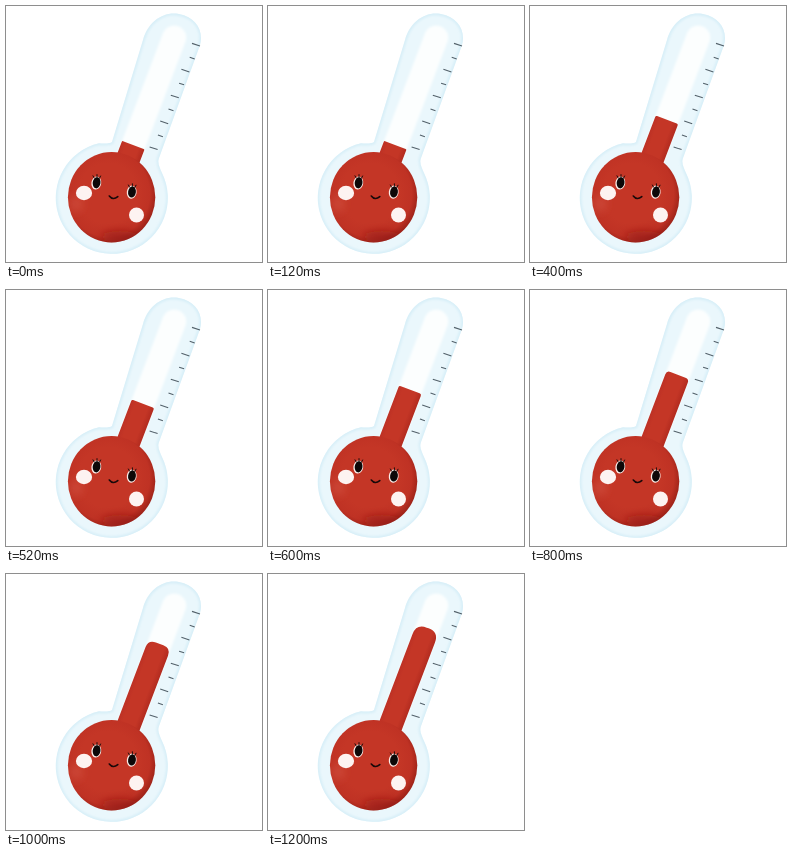
Animation, 256 px wide and 256 px high, one loop 1.4 s. Source, as an HTML page:

```html
<!DOCTYPE html>
<html lang="en">
<head>
<meta charset="utf-8">
<title>Thermometer</title>
<style>
  html, body { margin: 0; width: 100%; height: 100%; overflow: hidden; background: #fff; }
  svg { display: block; width: 100vw; height: 100vh; }
</style>
</head>
<body>
<svg viewBox="0 0 256 256">
  <defs>
    <radialGradient id="red" cx=".46" cy=".46" r=".56">
      <stop offset=".6" stop-color="#c43626"/>
      <stop offset=".85" stop-color="#bf3224"/>
      <stop offset="1" stop-color="#9c2218"/>
    </radialGradient>
    <linearGradient id="stem">
      <stop offset="0" stop-color="#bd3125"/>
      <stop offset=".2" stop-color="#c43626"/>
      <stop offset=".75" stop-color="#c43626"/>
      <stop offset="1" stop-color="#b22b1f"/>
    </linearGradient>
    <filter id="soft" x="-30%" y="-30%" width="160%" height="160%"><feGaussianBlur stdDeviation="1"/></filter>
    <filter id="shade" x="-60%" y="-60%" width="220%" height="220%"><feGaussianBlur stdDeviation="4"/></filter>
    <path id="shell" d="M106 136 L137 34 C142 16 157 5 173 8 C190 11 198 25 194 39 L153 152 C151 157 154 162 156 167 A56 56 0 1 1 93 137.3 Q104 138 106 136Z"/>
    <clipPath id="inside"><use href="#shell"/></clipPath>
    <clipPath id="ball"><ellipse cx="105.6" cy="191.2" rx="43.7" ry="45.2"/></clipPath>
  </defs>

  <use href="#shell" fill="#eaf7fc"/>
  <g clip-path="url(#inside)">
    <use href="#shell" fill="none" stroke="#d8eff8" stroke-width="4" filter="url(#soft)"/>
  </g>

  <g transform="translate(127 140) rotate(20.8)">
    <rect x="-12" y="-128" width="24" height="150" rx="12" fill="#fcfefe" filter="url(#soft)"/>
    <path id="level" fill="url(#stem)"/>
  </g>

  <ellipse cx="105.6" cy="191.2" rx="43.7" ry="45.2" fill="url(#red)"/>
  <g clip-path="url(#ball)">
    <g filter="url(#shade)">
      <ellipse cx="114" cy="231" rx="19" ry="6" fill="#8f1a10" opacity=".6"/>
      <ellipse cx="70" cy="198" rx="6" ry="8" fill="#d9604f" opacity=".45"/>
    </g>
  </g>

  <path id="ticks" fill="none" stroke="#53616a" stroke-width="1.1"/>

  <g fill="#fdf3f1">
    <ellipse cx="78" cy="187" rx="8.1" ry="7.2"/>
    <ellipse cx="130.5" cy="209" rx="7.5" ry="7.4"/>
  </g>
  <g id="eye">
    <ellipse cx="90.3" cy="177" rx="4.9" ry="6.6" fill="#fbeeea" transform="rotate(8 90.3 177)"/>
    <ellipse cx="90.6" cy="176.8" rx="3.9" ry="5.6" fill="#0d0808" transform="rotate(8 90.6 176.8)"/>
    <path d="M88.2 172 L87 169.8 M91 171.2 V168.6 M93.4 172.4 L94.6 170" stroke="#0d0808" stroke-width=".9" stroke-linecap="round"/>
  </g>
  <use href="#eye" x="35.4" y="9.2"/>
  <path d="M103.3 190 Q107 194.8 111.8 190.6" fill="none" stroke="#180909" stroke-width="1.6" stroke-linecap="round"/>
</svg>
<script>
const STEP = 200;
const heights = [1, 13, 28, 43, 59, 75, 92];
const level = document.getElementById('level');

let marks = '';
for (let i = 0; i < 9; i++) {
  const len = i % 2 ? 5 : 8;
  marks += `M${194 - 5.3 * i} ${40 + 12.95 * i}l${-len} ${-len * 0.33}`;
}
document.getElementById('ticks').setAttribute('d', marks);

// The top of the liquid grows rounder as it rises.
function draw(now) {
  const i = Math.floor(now / STEP) % heights.length;
  const h = heights[i];
  const r = [1, 1, 1.5, 2, 4, 8, 11][i];
  level.setAttribute('d',
    `M-12 14V${r - h}Q-12 ${-h} ${r - 12} ${-h}H${12 - r}Q12 ${-h} 12 ${r - h}V14Z`);
  requestAnimationFrame(draw);
}
draw(0);
</script>
</body>
</html>
```
